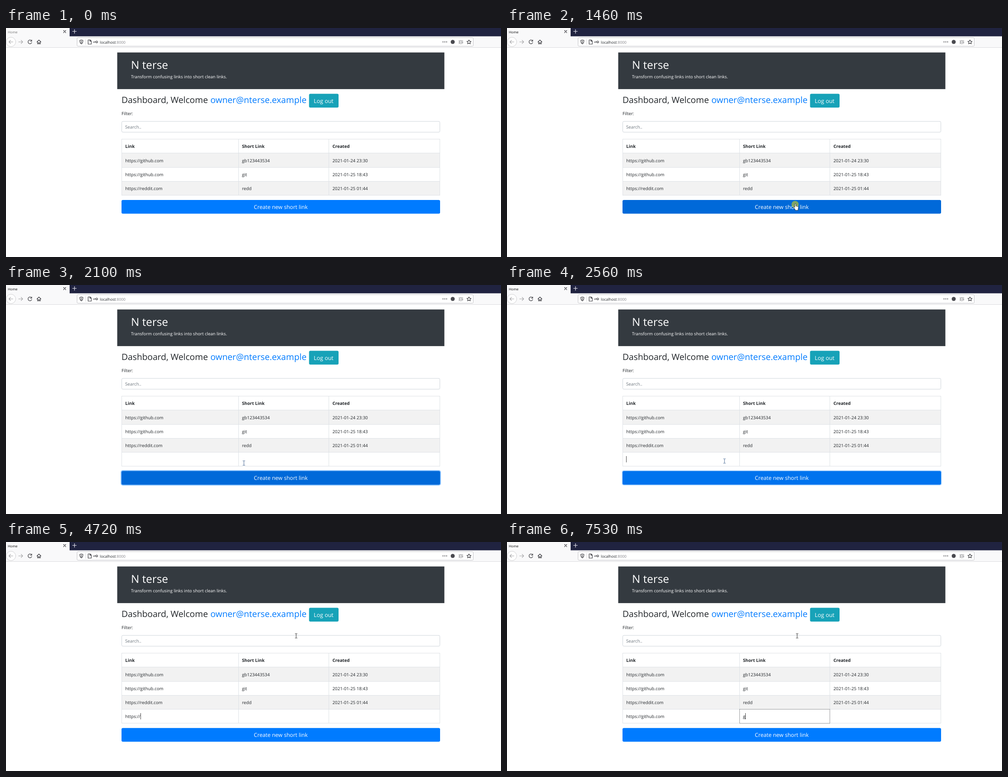
Write an HTML page that moves like this. It is 1097 by 510 pixels and loops after 7990 ms.

```html
<!DOCTYPE html>
<html lang="en">
<head>
<meta charset="utf-8">
<title>Home</title>
<style>
  html, body { margin: 0; width: 100%; height: 100%; overflow: hidden; background: #fff; }
  svg { display: block; width: 100%; height: 100%; }
  text { font: 9.75px "Open Sans", "Noto Sans", sans-serif; fill: #212529; white-space: pre; text-rendering: geometricPrecision; }
  .light { fill: #fff; }
  .bold { font-weight: 700; }
  .h1 { font-size: 24.4px; }
  .h2 { font-size: 19.25px; }
  .button { font-size: 12.1px; fill: #fff; }
  .small { font-size: 7.6px; }
  .url { font-size: 8.45px; }
  .icon { fill: none; stroke: #38383d; stroke-width: 1.2; stroke-linecap: round; stroke-linejoin: round; }
  .grid { fill: none; stroke: #dee2e6; shape-rendering: crispEdges; }
</style>
</head>
<body>
<svg viewBox="0 0 1097 510">
  <!-- Browser window -->
  <rect y="18" width="1097" height="25" fill="#f9f9fa"/>
  <rect width="1097" height="18.5" fill="#202340"/>
  <rect width="141" height="19" fill="#f9f9fa"/>
  <path d="M0 43.5H1097" stroke="#dcdcde"/>
  <text id="tabTitle" class="small" x="4" y="11.5">Home</text>
  <g class="icon">
    <path d="M127.5 5.5l5 5m0-5l-5 5"/>
    <path d="M147.5 7.5h8.5m-4.2-4.2v8.5" stroke="#e8e8f0"/>
    <circle cx="11" cy="31" r="10.5" fill="#fff" stroke="#d0d0d2" stroke-width="1"/>
    <path d="M15.5 31h-9m3.5-3.7L6.5 31l3.5 3.7M28 31h9m-3.5-3.7L37 31l-3.5 3.7" stroke="#a5a5a8"/>
    <path d="M56.3 28.2a4.2 4.2 0 1 0 .7 4.2M57 26.5v3h-3"/>
    <path d="M68.5 31.2l4.5-4.4 4.5 4.4M70 30.5v5h2v-3h2v3h2v-5"/>
    <rect x="157.5" y="21.5" width="878" height="19" rx="2" fill="#fff" stroke="#c4c4c8" stroke-width="1"/>
    <path d="M163.5 27.5l3.5-1 3.5 1c0 4-1 6.5-3.5 8-2.500-1.500-3.500-4-3.500-8zM167 28.500v4.500"/>
    <path d="M176.5 25v12" stroke="#dcdcde" stroke-width="1"/>
    <path d="M182 26.5h4.5l2.5 2.5v7h-7zM186 26.5v3h3"/>
    <path d="M194 31h4.8m-3.8 0v1.6"/>
    <circle cx="201" cy="31" r="2"/>
    <path d="M968.5 31h.01M972.5 31h.01M976.5 31h.01" stroke-width="2.2"/>
    <path d="M1026 26.5l1.4 3 3.3.4-2.4 2.2.6 3.3-2.900-1.600-2.900 1.600.6-3.300-2.400-2.200 3.300-.4z"/>
    <g stroke="#a0a0a3">
      <ellipse cx="1008" cy="31.5" rx="2.6" ry="3.8"/>
      <path d="M1003.5 28l2 1.2m-2.5 2.3h10m-9.5 3.5l2-1.200m7-5.800l-2 1.200m2 4.600l-2-1.200"/>
    </g>
  </g>
  <circle cx="990" cy="31" r="4.5" fill="#4a4a4f"/>
  <text class="url" x="208" y="34.5">localhost<tspan fill="#85858a">:8000</tspan></text>

  <!-- Page -->
  <rect x="246.5" y="54.5" width="725" height="81.6" fill="#343a40"/>
  <text class="h1 light" x="277" y="91">N terse</text>
  <text class="light" x="277" y="112" style="font-size:9.6px">Transform confusing links into short clean links.</text>
  <text class="h2" x="256" y="167">Dashboard, Welcome</text>
  <text class="h2" x="453" y="167" style="fill:#007bff">owner@nterse.example</text>
  <rect x="671.6" y="146.6" width="65.4" height="30.6" rx="3" fill="#17a2b8"/>
  <text class="button" x="682" y="167" style="font-size:12.5px">Log out</text>
  <text x="256" y="193.5">Filter:</text>
  <rect x="256.5" y="208" width="705" height="24" rx="2.5" fill="#fff" stroke="#ced4da"/>
  <text x="264" y="223.5" style="fill:#6c757d">Search..</text>

  <g id="table"></g>
  <g id="newRow">
    <path class="grid" d="M256.5 372V403.5H961.5V372M515.5 372V403M715.5 372V403"/>
    <text id="link" x="264.3" y="391.8"></text>
    <text id="short" x="523" y="391.8"></text>
    <rect id="focus" x="515.5" y="372.5" width="200" height="31.5" fill="none" stroke="#555" stroke-dasharray="1 1"/>
    <rect id="caret" y="381" width="1" height="14" fill="#444"/>
  </g>
  <g id="create">
    <rect id="ring" x="256" y="383" width="706" height="30.5" rx="3" fill="none" stroke="#268fff" stroke-opacity=".5" stroke-width="4"/>
    <rect id="face" x="256" y="383" width="706" height="30.5" rx="3"/>
    <text class="button" x="609" y="403" text-anchor="middle">Create new short link</text>
  </g>

  <!-- Pointer shapes, hot spot at 0,0 -->
  <circle id="click" cx="638.5" cy="393" r="8" fill="#f0dc00" fill-opacity=".52"/>
  <g id="pointer">
    <path id="arrow" d="M0 0v11.5l2.7-2.4 1.8 4.2 1.8-.8-1.8-4h3.7z" fill="#fff" stroke="#000" stroke-width=".8"/>
    <path id="hand" d="M-1.2 1q1.2-1.8 2.4 0v4.5l5 1.3q1 .4.8 2l-.9 3.7v2.5H-.5v-2L-4 8.8q-.8-1.7 1-1.5l1.800 1.300z" fill="#fff" stroke="#222" stroke-width=".8"/>
    <path id="beam" d="M-2.5-5h2L0-4.5.5-5h2M-2.5 5h2L0 4.5.5 5h2M0-4.5v9" fill="none"/>
  </g>
</svg>
<script>
const LOOP = 7990;
const $ = id => document.getElementById(id);
const show = (id, on) => $(id).setAttribute("visibility", on ? "visible" : "hidden");
const clamp = v => Math.min(1, Math.max(0, v));
const ramp = (t, start, end) => clamp((t - start) / (end - start));

const columns = [264.3, 523, 723.5];
const rows = [
  ["https://github.com", "gb123443534", "2021-01-24 23:30"],
  ["https://github.com", "git", "2021-01-25 18:43"],
  ["https://reddit.com", "redd", "2021-01-25 01:44"],
];
const cells = (row, y, style = "") =>
  row.map((s, i) => `<text class="${style}" x="${columns[i]}" y="${y}">${s}</text>`).join("");

$("table").innerHTML =
  [279, 341].map(y => `<rect x="256" y="${y}" width="706" height="31" fill="#f2f2f2"/>`).join("") +
  `<path class="grid" d="M256.5 247.5H961.5V372.5H256.5zM515.5 247V372M715.5 247V372M256 278.5H962M256 310.5H962M256 341.5H962"/>` +
  cells(["Link", "Short Link", "Created"], 267, "bold") +
  rows.map((row, i) => cells(row, 298.7 + 31 * i)).join("");

const typed = "https://github.com";
const keyTimes = [3260, 3410, 3560, 3720, 3870, 4270, 4580, 4720, 5040,
  5210, 5360, 5440, 5520, 5670, 5900, 5980, 6130, 6200];
const caretOn = [[2480, 3030], [3260, 4120], [4270, 6200], [6430, 6910], [7460, LOOP]];

// Pointer moves: start, end, number of positions, from, to
const moves = [
  [530, 1160, 9, [1034, 503], [639, 391]],
  [1550, 1550, 1, [640, 392], [640, 392]],
  [2020, 2160, 3, [600, 395], [503, 397]],
  [2330, 2400, 2, [488, 393], [482, 392]],
  [3180, 3410, 4, [508, 372], [641.5, 210]],
  [3870, 3870, 1, [643, 209], [643, 209]],
];

function pointerAt(t) {
  const move = moves.findLast(m => t >= m[0]);
  if (!move) return null;
  const [start, end, count, from, to] = move;
  const p = count < 2 ? 1 : Math.floor(ramp(t, start, end) * (count - 1) + 0.01) / (count - 1);
  const eased = 1 - (1 - p) ** 2;
  return from.map((v, i) => v + (to[i] - v) * eased);
}

// 0 is the resting blue, 1 the hover blue, above 1 pressed
function buttonShade(t) {
  if (t < 1550) return ramp(t, 930, 1080);
  if (t < 2480) return 1.2 - 0.2 * ramp(t, 1550, 1850);
  return 1 - ramp(t, 2480, 2630);
}

// The focus ring fades in after the click and out when the cell takes focus
const ringOpacity = t => ramp(t, 1460, 1850) * (1 - ramp(t, 2480, 2630));

function draw(t) {
  const opened = t >= 1550;
  $("tabTitle").style.fill = t < 1460 ? "#777" : "#111";

  const shade = buttonShade(t);
  $("face").setAttribute("fill", `rgb(0,${Math.round(123 - 18 * shade)},${Math.round(255 - 38 * shade)})`);
  $("create").setAttribute("transform", `translate(0 ${opened ? 31.2 : 0})`);
  $("ring").setAttribute("opacity", opened ? ringOpacity(t) : 0);

  $("newRow").style.display = opened ? "" : "none";
  $("link").textContent = typed.slice(0, keyTimes.filter(k => k <= t).length);
  $("short").textContent = t >= 7530 ? "g" : "";
  const inShort = t >= 6430;
  show("focus", inShort);
  show("caret", caretOn.some(([on, off]) => t >= on && t < off));
  const length = opened ? $(inShort ? "short" : "link").getComputedTextLength() : 0;
  $("caret").setAttribute("x", Math.round(columns[+inShort] + length));

  const at = pointerAt(t);
  const hovering = at && !opened && at[1] < 413;
  show("click", t >= 1460 && !opened);
  show("arrow", at && !opened && !hovering);
  show("hand", hovering);
  show("beam", opened);
  $("beam").setAttribute("stroke", t < 3180 ? "#4a6a94" : "#333");
  if (at) $("pointer").setAttribute("transform", `translate(${at})`);
}

function tick() {
  draw(performance.now() % LOOP);
  requestAnimationFrame(tick);
}
tick();
</script>
</body>
</html>
```
